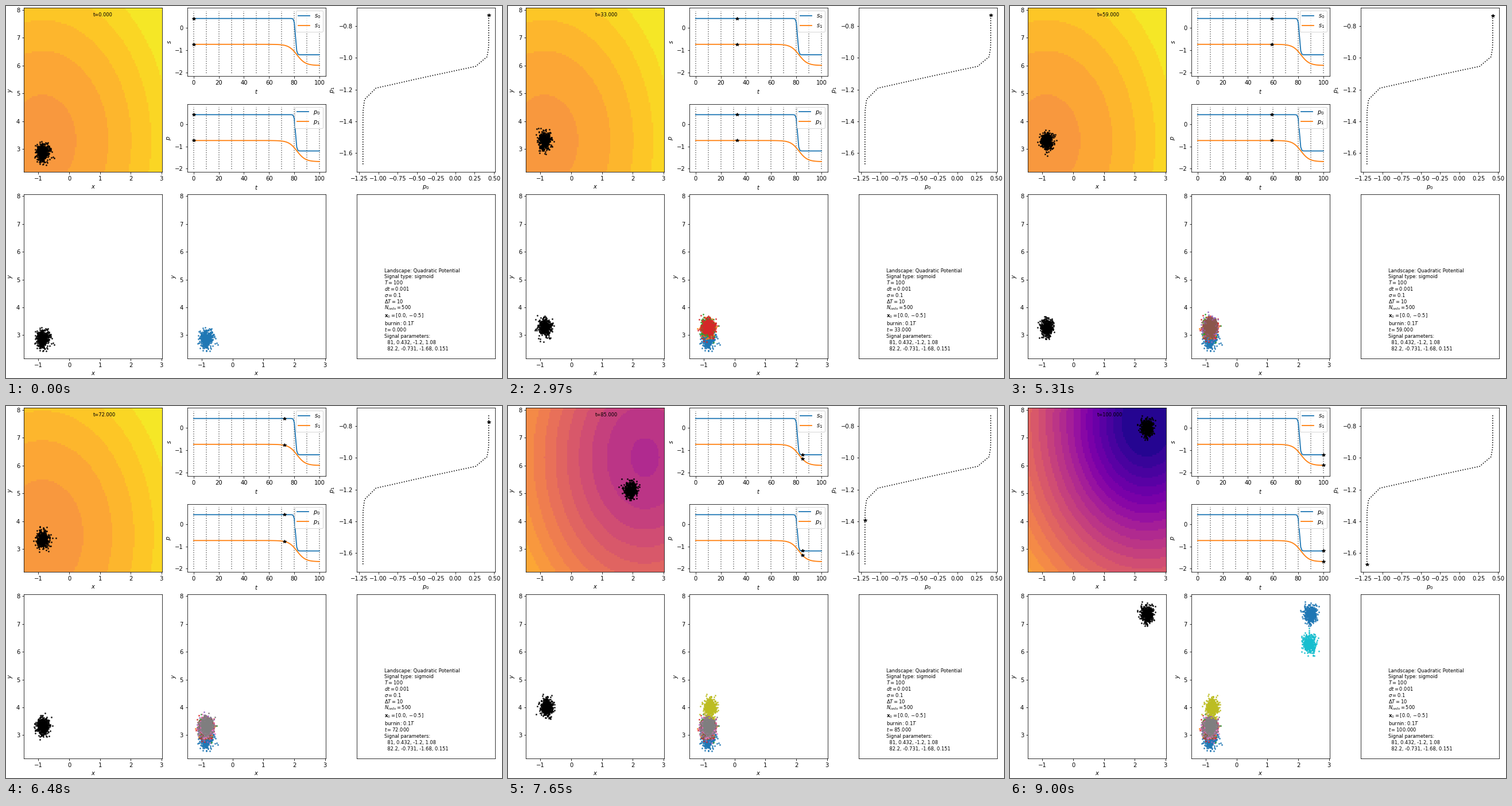
These frames come from a looping animation (864x648 px, 9090 ms). A matplotlib script:

```python
import numpy as np
import matplotlib.pyplot as plt
from matplotlib.animation import FuncAnimation
from matplotlib.colors import ListedColormap

W, H, DPI = 864, 648, 72
LAYOUT_DPI = 100
T, STEP, N_CELLS = 100, 10, 500
SIGMA, BURN_IN, SUB = 0.1, 10, 100
XLIM, YLIM = (-1.472, 3.024), (2.165, 8.075)
BAND = 0.04

plt.rcParams.update({"font.family": "DejaVu Sans", "font.size": 10})


def sigmoid(t, center, start, end, rate):
    return start + (end - start) * 0.5 * (1 + np.tanh(rate * (t - center)))


def signal(t):
    return np.array([sigmoid(t, 81, 0.432, -1.2, 1.08),
                     sigmoid(t, 82.2, -0.731, -1.68, 0.151)])


def simulate():
    """Noisy descent in x^2/4 + y^2/9 + p0 x + p1 y, stored at whole times."""
    rng = np.random.default_rng(7)
    dt = 1 / SUB
    curve = np.array([1 / 2, 2 / 9])
    cells = np.tile([0.0, -0.5], (N_CELLS, 1))
    states = []
    for i in range(-BURN_IN * SUB, T * SUB + 1):
        if i >= 0 and i % SUB == 0:
            states.append(cells.copy())
        force = -curve * cells - signal(max(i, 0) * dt)
        noise = rng.standard_normal(cells.shape)
        cells = cells + force * dt + SIGMA * np.sqrt(dt) * noise
    return states


times = np.arange(T + 1)
sig = signal(times)
states = simulate()


# Landscape on a coarse grid, log-scaled and cut into colour bands
def cell_centers(lim, n=100):
    edges = np.linspace(*lim, n + 1)
    return (edges[1:] + edges[:-1]) / 2


gx, gy = np.meshgrid(cell_centers(XLIM), cell_centers(YLIM))


def potential(k):
    p0, p1 = sig[:, k]
    return gx**2 / 4 + gy**2 / 9 + p0 * gx + p1 * gy


low = min(potential(k).min() for k in times)
high = max(potential(k).max() for k in times)


def bands(k):
    level = np.log1p(potential(k) - low) / np.log1p(high - low)
    return np.clip(np.round(level / BAND), 1, 24)


cmap = ListedColormap(plt.get_cmap("plasma")(np.arange(25) * BAND))


def plane(ax):
    ax.set(xlim=XLIM, ylim=YLIM, xticks=range(-1, 4), yticks=range(3, 9),
           xlabel="$x$", ylabel="$y$")


def series_axes(ax, name):
    ax.set(xlim=(-5, 105), ylim=(-2.155, 0.907), yticks=[-2, -1, 0],
           xlabel="$t$", ylabel=f"${name}$")


def dots(ax, color):
    return ax.plot([], [], "o", color=color, ms=3, mew=0, alpha=0.8)[0]


def star(ax):
    return ax.plot([], [], "k*", ms=6, zorder=4)[0]


def series(rect, name):
    ax = fig.add_axes(rect)
    for i in range(2):
        ax.plot(times, sig[i], lw=1.8, label=f"${name}_{i}$")
    pad = 0.2 * 1.68
    ax.vlines(times[::STEP], -1.68 - pad, 0.432 + pad, colors="k",
              linestyles=":", alpha=0.6, zorder=1)
    series_axes(ax, name)
    ax.legend(loc="upper right")
    return [star(ax) for _ in range(2)]


fig, axes = plt.subplots(2, 3, figsize=(W / DPI, H / DPI), dpi=DPI,
                         facecolor="white")
(land_ax, slot, path_ax), (snap_ax, history_ax, info_ax) = axes
for ax in (land_ax, snap_ax, history_ax):
    plane(ax)
series_axes(slot, "s")
path_ax.set(xlim=(-1.2816, 0.5136), ylim=(-1.7228, -0.6838),
            xlabel="$p_0$", ylabel="$p_1$")
info_ax.set(xticks=[], yticks=[])

# Solve the layout once, with finer text metrics, then freeze it
fig.set_layout_engine("constrained", hspace=0)
fig.set_dpi(LAYOUT_DPI)
fig.draw_without_rendering()
fig.set_layout_engine("none")
fig.set_dpi(DPI)

# The upper middle slot holds two stacked charts
box = slot.get_position()
slot.remove()
part = (box.height - 49 / H) / 2
signal_stars = (series([box.x0, box.y1 - part, box.width, part], "s")
                + series([box.x0, box.y0, box.width, part], "p"))

image = land_ax.imshow(bands(0), cmap=cmap, vmin=-0.5, vmax=24.5, origin="lower",
                       extent=(*XLIM, *YLIM), aspect="auto",
                       interpolation="nearest")
live = dots(land_ax, "k")
clock = land_ax.text(0.5, 0.95, "", transform=land_ax.transAxes, fontsize="small")

path_ax.plot(*sig, "k:", lw=1.6)
path_star = star(path_ax)

snapshot = dots(snap_ax, "k")
history = [dots(history_ax, f"C{i % 10}") for i in range(T // STEP + 1)]


def info_lines(lines, pitch=10.9, gap=2.6):
    """Stack lines upwards from the last; the bold vector row gets more room."""
    rows, y = [], 0
    for line in reversed(lines):
        tall = "mathbf" in line
        y += gap * tall
        rows.append(info_ax.annotate(
            line, (0.2, 0.05), xycoords="axes fraction", xytext=(0, y),
            textcoords="offset points", fontsize="small"))
        y += pitch + gap * tall
    return rows[::-1]


info = info_lines([
    "Landscape: Quadratic Potential",
    "Signal type: sigmoid",
    f"$T={T}$",
    "$dt=0.001$",
    rf"$\sigma={SIGMA}$",
    rf"$\Delta T={STEP}$",
    f"$N_{{cells}}={N_CELLS}$",
    r"$\mathbf{x}_0=[0.0, -0.5]$",
    "burnin: $0.1T$",
    "$t=0.000$",
    "Signal parameters:",
    "  81, 0.432, -1.2, 1.08",
    "  82.2, -0.731, -1.68, 0.151",
])
time_row = info[9]


def update(k):
    image.set_data(bands(k))
    live.set_data(*states[k].T)
    clock.set_text(f"t={k:.3f}")
    for i, mark in enumerate(signal_stars):
        mark.set_data([k], [sig[i % 2, k]])
    path_star.set_data([sig[0, k]], [sig[1, k]])

    last = k // STEP
    snapshot.set_data(*states[last * STEP].T)
    for i, cloud in enumerate(history):
        cloud.set_data(*(states[i * STEP].T if i <= last else ([], [])))
    time_row.set_text(f"$t={k:.3f}$")
    return []


anim = FuncAnimation(fig, update, frames=T + 1, interval=90, repeat=True,
                     repeat_delay=0, init_func=lambda: update(0))
plt.show()
```
